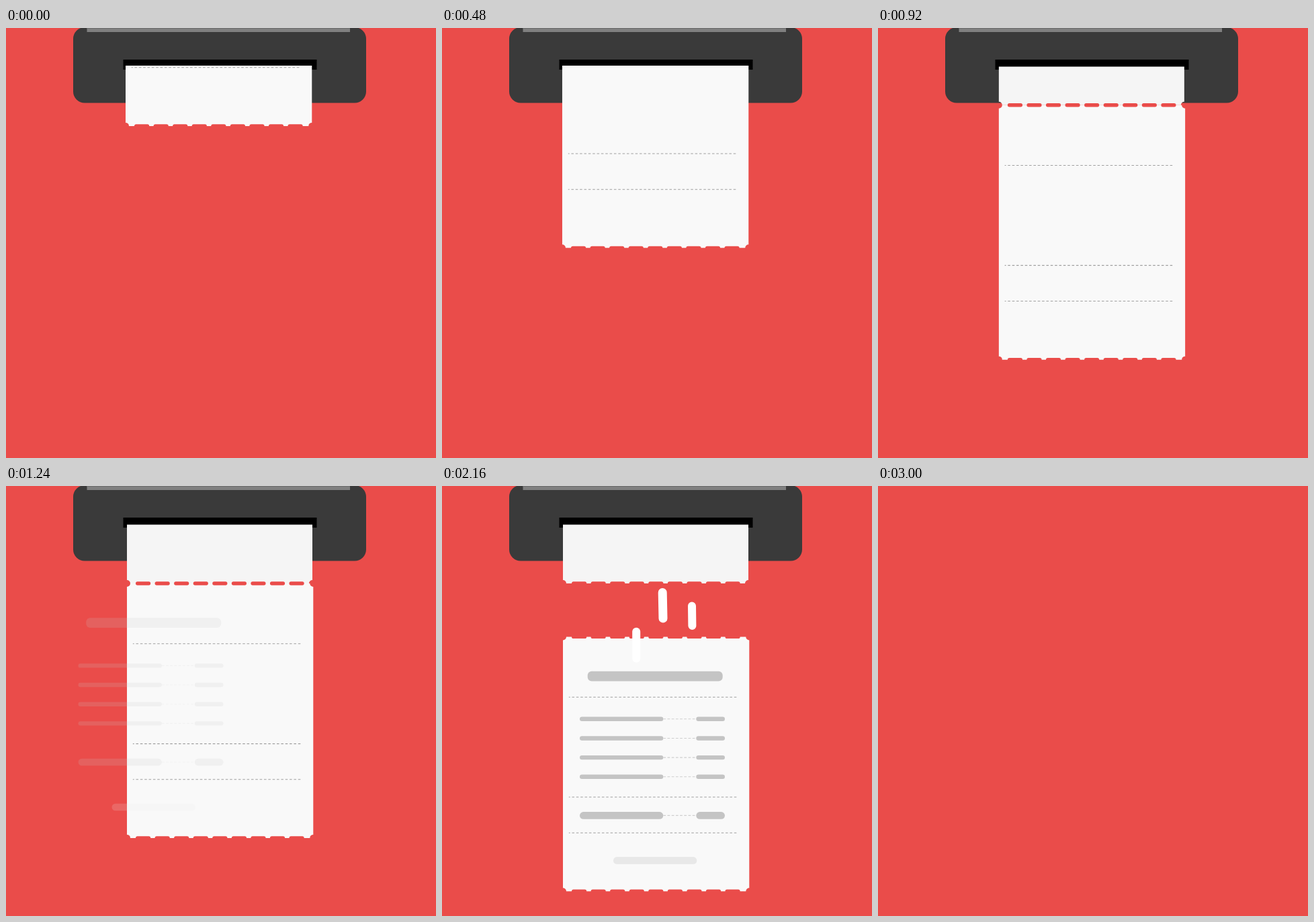
Recreate the animation shown at these times as an HTML page with a canvas. Size 640 by 640 pixels, loop 3.04 s.

```html
<!DOCTYPE html>
<html lang="en">
<head>
<meta charset="utf-8">
<title>Receipt printer</title>
<style>
html, body { margin: 0; height: 100%; overflow: hidden; background: #ea4c4a; }
canvas { display: block; }
</style>
</head>
<body>
<canvas id="stage" width="640" height="640"></canvas>
<script>
const c = document.getElementById('stage').getContext('2d');
const LOOP = 3040, STEP = 40, Q = Math.PI / 2;
const clamp = v => Math.max(0, Math.min(1, v));

function box(x, y, w, h, color, r = 0) {
  c.fillStyle = color;
  c.beginPath();
  c.roundRect(x, y, w, h, r);
  c.fill();
}

// Bar with round ends, centred on y
const bar = (x1, x2, y, h, color) => box(x1, y - h / 2, x2 - x1, h, color, h / 2);

function dashes(x1, x2, y, color, pattern, offset = 0) {
  c.strokeStyle = color;
  c.lineWidth = 1.1;
  c.setLineDash(pattern);
  c.lineDashOffset = offset;
  c.beginPath();
  c.moveTo(x1, y);
  c.lineTo(x2, y);
  c.stroke();
}

// Paper with round corner cuts and nine slots along each torn edge
function sheet(x, w, top, bottom, color) {
  const slots = Array.from({ length: 9 }, (_, i) => 204.1 + 28.56 * i);
  const cut = (cx, y, r, from, to) => c.arc(cx, y, r, from * Q, to * Q, true);
  c.beginPath();
  cut(x, top, 5, 1, 0);
  for (const s of slots) {
    cut(s - 8.4, top, 2.7, 2, 1);
    cut(s + 8.4, top, 2.7, 1, 0);
  }
  cut(x + w, top, 5, 2, 1);
  cut(x + w, bottom, 5, 3, 2);
  for (const s of slots.reverse()) {
    cut(s + 8.4, bottom, 2.7, 4, 3);
    cut(s - 8.4, bottom, 2.7, 3, 2);
  }
  cut(x, bottom, 5, 4, 3);
  c.closePath();
  c.fillStyle = color;
  c.fill();
}

function clipBelow(y) {
  c.save();
  c.beginPath();
  c.rect(0, y, 640, 640 - y);
  c.clip();
}

function printer() {
  box(100, -1, 436, 112.5, '#3a3a3a', 17);
  box(120.5, 0, 391.5, 6, '#808080');
  box(120.5, 0, 391.5, 1, '#6c6c6c');
  box(174.5, 47, 288, 15, '#000');
}

function lines(p) {
  c.save();
  c.globalAlpha = p ** 0.9;
  c.translate(-113.75 * (1 - p), 0);
  box(216.7, 196.3, 201, 14.7, '#c4c4c4', 6);
  const item = (y, h) => {
    bar(205, 329.3, y, h, '#c4c4c4');
    bar(378.3, 421, y, h, '#c4c4c4');
    dashes(329.3, 378.3, y, '#cfcfcf', [3.8, 2.4]);
  };
  for (let i = 0; i < 4; i++) item(267.4 + 28.65 * i, 6.4);
  item(411, 10.6);
  bar(255, 379.3, 478, 10.6, '#e8e8e8');
  c.restore();
}

function streak(x, y, w, h, tilt) {
  c.strokeStyle = '#fff';
  c.lineWidth = w;
  c.lineCap = 'round';
  c.setLineDash([]);
  c.beginPath();
  c.moveTo(x - tilt, y + w / 2);
  c.lineTo(x + tilt, y + h - w / 2);
  c.stroke();
  c.lineCap = 'butt';
}

function draw(t) {
  box(0, 0, 640, 640, '#ea4c4a');
  if (t >= 3000) return;
  printer();

  const feed = 1 - clamp(t / 1000), rise = -378 * feed, drift = -2 * feed;
  const fall = t < 2160 ? 0 : 2.09 * (t - 2122);

  clipBelow(57.4);
  c.translate(drift, rise);
  sheet(180, 276, -500, 145, '#f5f5f5');
  c.restore();
  if (t >= 2360) return;

  clipBelow(56);
  c.save();
  c.translate(drift, rise + fall);
  sheet(180, 277.3, 145, 523.9, '#f9f9f9');
  for (const y of [234.8, 383.6, 436.8])
    dashes(188.8, 438.7, y, '#a0a0a0', [3.6, 2.75], 1.7);
  if (t > 1200) lines(clamp((t - 1200) / 280));
  c.restore();
  if (fall) {
    c.translate(0, fall - 79.4);
    streak(328.6, 152, 13, 51.5, 0.4);
    streak(372.2, 172.5, 12, 41.5, 0.2);
    streak(289.2, 210.8, 12, 52, 0);
  }
  c.restore();
}

const start = performance.now();
function tick() {
  const t = (performance.now() - start) % LOOP;
  draw(Math.floor(t / STEP) * STEP);
  requestAnimationFrame(tick);
}
tick();
</script>
</body>
</html>
```
